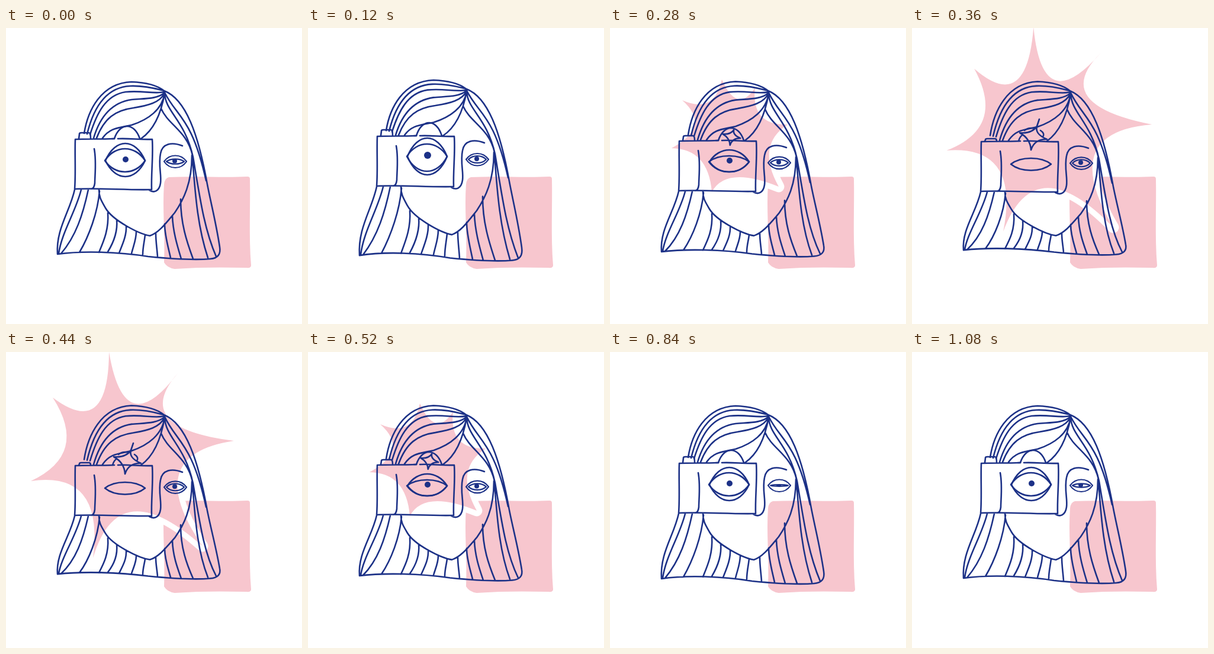
An HTML page with a canvas for the animation above (1200 ms loop, 500 px wide and 500 px high).

```html
<!DOCTYPE html>
<html lang="en">
<head>
<meta charset="utf-8">
<title>Camera flash</title>
<style>
html, body { margin: 0; height: 100%; overflow: hidden; background: #fff }
canvas { display: block; width: 100vmin; height: 100vmin }
</style>
</head>
<body>
<canvas id="stage" width="500" height="500"></canvas>
<script>
const ctx = document.getElementById('stage').getContext('2d');
const NAVY = '#1c3187', PINK = '#f7c6ce';

const SQUARE = 'M275,252 C320,250 370,253 408,251 Q412,251 412,255 C413,300 410,350 414,401 Q414,406 406,405 C365,404 325,404 285,407 Q272,405 267,396 C269,350 264,305 267,264 Q268,254 275,252Z';

const HEAD = `
M132,178 C138,140 160,93 212,91 C240,92 258,99 267,106
M137,179 C146,142 165,100 210,98 C235,97 255,103 267,106
M142,180 C153,145 168,113 202,108 C230,105 250,112 267,108
M148,186 C158,152 178,126 212,121 C235,119 255,120 267,110
M153,186 C166,152 185,139 215,135 C240,131 260,126 268,110
M163,186 C176,168 190,169 212,164 C240,155 264,138 268,110
M228,187 C250,172 262,145 268,110
M267,106 C304,120 325,180 340,264
M268,109 C288,150 314,150 338,258
M268,110 C269,142 302,155 316,218
M262,136 C274,164 306,174 315,215
M314,215 C314,262 300,290 285,312 C270,330 258,346 243,351 C225,348 180,325 168,304 C160,290 157,285 157,273
M116,273 C108,310 84,340 87,382 C130,376 190,378 240,386 C280,390 320,392 345,390 C358,389 363,382 361,370 C355,330 347,300 340,264
M127,273 C118,310 94,345 89,381
M139,273 C130,315 118,352 93,381
M158,275 C155,312 140,352 124,379
M172,312 C174,340 165,360 157,379
M187,324 C189,345 180,365 172,378
M203,334 C204,350 197,365 191,380
M220,344 C220,358 215,368 212,381
M235,349 C234,360 231,370 231,383
M253,347 C253,360 255,372 256,386
M268,331 C268,350 274,370 278,388
M281,317 C282,345 290,370 296,390
M295,289 C295,330 305,360 316,390
M315,218 C320,290 325,340 341,388
M316,218 C328,290 335,340 355,386
M298,199 C280,192 264,195 261,212 C257,232 263,248 261,262 C259,276 250,279 242,274
M183,187 C156,188 137,187 117,188 C116,215 118,245 116,272 C160,270 200,274 246,273 C245,245 249,215 247,188 C225,189 210,186 189,187
M149,204 C153,225 150,250 150,262 Q149,271 144,272`;

// Each tip is followed by the control point of the edge to the next tip.
const SMALL = [122,122, 176,146, 189,87, 215,146, 245,101, 238,165, 300,163, 246,198,
  285,268, 196,232, 172,277, 166,204, 104,203, 172,166];
const LARGE = [79,77, 173,148, 174,0, 200,155, 290,36, 210,128, 385,150, 226,174,
  332,328, 190,201, 147,348, 166,200, 42,218, 140,172];
const SPARK = [211,166, 207,179, 228,188, 207,187, 201,206, 200,187, 182,177, 202,179];

// top, cam, chin, hem: vertical shifts; eye: [y, outer up, outer down, inner up, inner down, pupil]
const rest = { top: 0, cam: 0, chin: 0, hem: 0, button: 10, bump: 21, eye: [224, 29, 27, 20, 19, 5], lid: .6 };
const up = { ...rest, top: -3, cam: -5, chin: -2, hem: 2.5, bump: 22, eye: [217, 31, 31, 21, 25, 6], lid: .85 };
const sink = { ...rest, top: -1, cam: 1, hem: -1, button: 9, eye: [225, 24, 22, 15, 18, 5] };
const flash = { ...rest, top: -.5, cam: 3, hem: -4.5, button: 8, eye: [226, 20, 17, 10, 17, 5], lid: .75,
  star: SMALL, spark: .65 };
const peak = { ...rest, top: -.5, cam: 4, hem: -7.5, button: 4, bump: 0, eye: [230, 10, 10.5, 10, 10.5, 0], lid: .85,
  star: LARGE, spark: 1 };
const blink = (lid, hem = 0) => ({ ...rest, lid, hem });
const poses = [rest, up, sink, flash, { ...peak, turn: 4, slide: 19 }, peak, flash, sink, rest,
  blink(.5), blink(.2, 1), blink(.15, 1), blink(.3), blink(.45)];

const lerp = (a, b, k) => a + (b - a) * k;

function shiftAt(y, p) {
  const stops = [[91, p.top], [187, p.cam], [272, p.cam], [350, p.chin], [385, p.hem]];
  if (y <= 91) return p.top;
  for (let i = 1; i < stops.length; i++) {
    const [y0, d0] = stops[i - 1], [y1, d1] = stops[i];
    if (y <= y1) return lerp(d0, d1, (y - y0) / (y1 - y0));
  }
  return p.hem;
}

const bend = (path, p) => new Path2D(path.replace(/([\d.]+),([\d.]+)/g,
  (_, x, y) => `${x},${+y + shiftAt(+y, p)}`));

function starPath(pts) {
  let d = `M${pts[0]},${pts[1]}`;
  for (let i = 2; i < pts.length; i += 4)
    d += `Q${pts[i]},${pts[i + 1]} ${pts[(i + 2) % pts.length]},${pts[(i + 3) % pts.length]}`;
  return new Path2D(d + 'Z');
}

function almond(x0, x1, y, rise, drop) {
  const inset = (x1 - x0) / 4, top = y - rise * 4 / 3, low = y + drop * 4 / 3;
  return new Path2D(`M${x0},${y} C${x0 + inset},${top} ${x1 - inset},${top} ${x1},${y}
    C${x1 - inset},${low} ${x0 + inset},${low} ${x0},${y}Z`);
}

function dot(x, y, r) {
  ctx.beginPath();
  ctx.arc(x, y, r, 0, 7);
  ctx.fill();
}

// The white rim shows only where the burst crosses the square.
function drawBurst(p) {
  const path = starPath(p.star);
  ctx.save();
  ctx.translate(200 + (p.slide || 0), 175);
  ctx.rotate((p.turn || 0) * Math.PI / 180);
  ctx.translate(-200, -175);
  ctx.strokeStyle = '#fff';
  ctx.lineWidth = 19;
  ctx.stroke(path);
  ctx.fill(path);
  ctx.restore();
}

function drawCameraTop(p) {
  const y = 187 + p.cam, b = y - p.button;
  ctx.stroke(new Path2D(`M123,${y} L124,${b + 2} Q124,${b} 127,${b} L140,${b} Q143,${b} 143,${y}`));
  if (p.bump) {
    const h = y - p.bump * 4 / 3;
    ctx.stroke(new Path2D(`M179,${y} L183,${y} C192,${h} 217,${h} 226,${y}`));
  } else {
    ctx.stroke(new Path2D(`M180,${y} Q182,184 186,181 M190,173 Q198,167 207,170 M217,173 Q225,178 221,184 M215,154 L211,166`));
  }
  if (p.spark) ctx.stroke(starPath(SPARK.map((v, i) => lerp(i % 2 ? 183 : 206, v, p.spark))));
}

function drawEyes(p) {
  const [y, outUp, outDown, inUp, inDown, pupil] = p.eye;
  ctx.stroke(almond(167, 235, y, inUp, inDown));
  if (pupil) {
    ctx.stroke(almond(168, 235, y, outUp, outDown));
    dot(202, y - 2, pupil);
  }
  const ey = 225.5 + p.cam * .7, lids = almond(271, 301, ey, 7 * p.lid, 7 * p.lid);
  ctx.lineWidth = 2.2;
  ctx.stroke(almond(267, 305, ey, 10, 10.5));
  ctx.stroke(lids);
  ctx.save();
  ctx.clip(lids);
  dot(285, ey - 1, 4);
  ctx.restore();
}

function draw(p) {
  ctx.fillStyle = '#fff';
  ctx.fillRect(0, 0, 500, 500);
  ctx.fillStyle = PINK;
  ctx.lineJoin = ctx.lineCap = 'round';
  ctx.fill(new Path2D(SQUARE));
  if (p.star) drawBurst(p);

  ctx.strokeStyle = ctx.fillStyle = NAVY;
  ctx.lineWidth = 2.6;
  ctx.stroke(bend(HEAD, p));
  drawCameraTop(p);
  drawEyes(p);
}

// The first and last poses hold 120 ms, the others 80 ms.
function tick() {
  const t = performance.now() % 1200;
  draw(poses[t < 120 ? 0 : Math.min(13, 1 + Math.floor((t - 120) / 80))]);
  requestAnimationFrame(tick);
}
tick();
</script>
</body>
</html>
```
